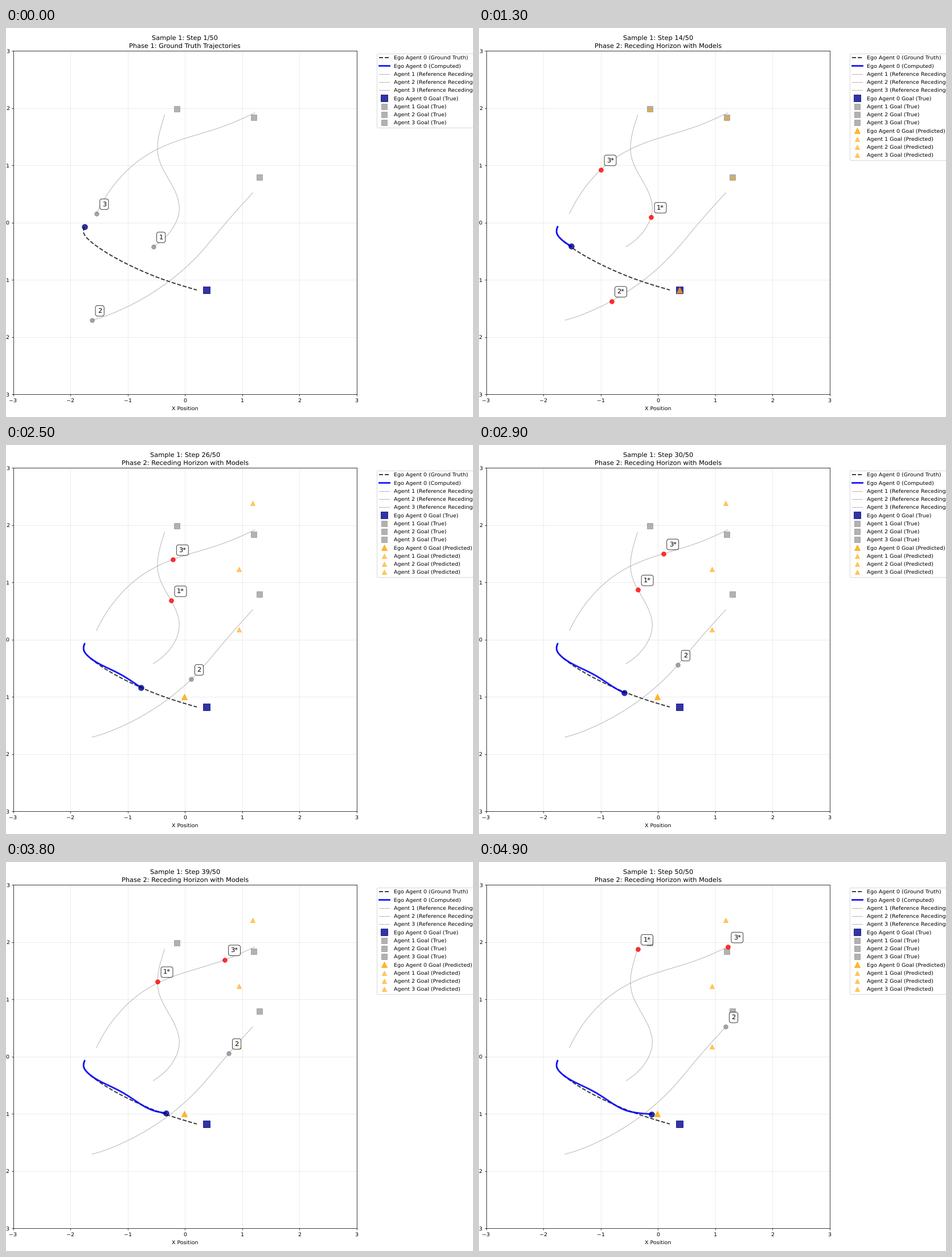
Recreate the animation shown at these times as a matplotlib script. Size 820 by 683 pixels, loop 5 s.

```python
import numpy as np
import matplotlib.pyplot as plt
from matplotlib.animation import FuncAnimation

plt.rcParams["font.family"] = "DejaVu Sans"
plt.rcParams["text.hinting"] = "none"

WIDTH, HEIGHT, DPI = 820, 683, 68.3
STEPS, INTERVAL = 50, 100
LEFT, TOP, SIDE = 12.5, 40.0, 603.3
PHASE_2_START = 10
PREDICTION_START = 20
KEY_STEPS = (0, 7, 13, 25, 34, 49)


def to_data(*points):
    """Stage pixels to axis units."""
    x, y = np.transpose(points)
    unit = SIDE / 6
    return np.column_stack([(x - LEFT) / unit - 3, 3 - (y - TOP) / unit])


def trajectory(*points, steps=KEY_STEPS):
    """Natural cubic spline through a few key points, one row per step."""
    t, p = np.array(steps, float), to_data(*points)
    n, h = len(t), np.diff(t)[:, None]
    slope = np.diff(p, axis=0) / h
    system, rhs = np.eye(n), np.zeros_like(p)
    for i in range(1, n - 1):
        a, b = h[i - 1, 0], h[i, 0]
        system[i, i - 1:i + 2] = a, 2 * (a + b), b
        rhs[i] = 6 * (slope[i] - slope[i - 1])
    curve = np.linalg.solve(system, rhs)

    at = np.arange(STEPS)
    k = np.clip(np.searchsorted(t, at, side="right") - 1, 0, n - 2)
    d = (at - t[k])[:, None]
    first = slope[k] - h[k] * (2 * curve[k] + curve[k + 1]) / 6
    return (p[k] + first * d + curve[k] / 2 * d**2
            + (curve[k + 1] - curve[k]) / (6 * h[k]) * d**3)


ego_truth = trajectory((138, 349), (139, 365), (162, 385), (227, 421.3),
                       (335, 460), steps=(0, 7, 13, 25, 49))
ego = trajectory((138, 349), (139, 365), (162, 383.3), (206, 405.5),
                 (237, 425.6), (270.6, 439.3), (303, 442.5),
                 steps=(0, 7, 13, 20, 25, 34, 49))
agents = [
    trajectory((258.5, 384), (285, 362), (302, 332), (290, 273.3),
               (268.5, 229.8), (278.5, 153)),
    trajectory((151, 513), (184.7, 502), (232.5, 479.5), (325.4, 411.3),
               (374, 356.5), (433.3, 289.3)),
    trajectory((158.7, 325.8), (182, 285.7), (214, 248.8), (293.3, 201),
               (360, 180), (436.8, 149)),
]

# Ego first, then agents 1 to 3
true_goals = to_data((352, 460.5), (299.5, 141.5), (444.5, 262), (435, 157))
predicted_goals = to_data((313, 442), (433, 102), (409, 324), (409, 217.5))

fig = plt.figure(figsize=((WIDTH + 0.001) / DPI, HEIGHT / DPI), dpi=DPI,
                 facecolor="white")
ax = fig.add_axes([LEFT / WIDTH, 1 - (TOP + SIDE) / HEIGHT,
                   SIDE / WIDTH, SIDE / HEIGHT])
ax.set(xlim=(-3, 3), ylim=(-3, 3),
       xticks=range(-3, 4), yticks=range(-3, 4))
ax.set_xlabel("X Position", labelpad=5.3)
ax.grid(True, alpha=0.3)


def marker(shape, color, size, alpha, label=None):
    return ax.plot([0], [0], shape, color=color, markersize=size,
                   alpha=alpha, label=label)[0]


def place(line, point):
    line.set_data(point[:1], point[1:])


truth_line, = ax.plot(*ego_truth.T, "k--", lw=2, alpha=0.8,
                      label="Ego Agent 0 (Ground Truth)")
ego_line, = ax.plot([], [], color="blue", lw=3, alpha=0.9,
                    label="Ego Agent 0 (Computed)")
handles = [truth_line, ego_line]
for i, path in enumerate(agents, 1):
    handles += ax.plot(*path.T, color="gray", lw=1, alpha=0.6,
                       label=f"Agent {i} (Reference Receding Horizon)")

names = ["Ego Agent 0"] + [f"Agent {i}" for i in (1, 2, 3)]
squares = [marker("s", "gray" if i else "darkblue", 10 if i else 12,
                  0.6 if i else 0.8, f"{name} Goal (True)")
           for i, name in enumerate(names)]
for square, goal in zip(squares, true_goals):
    place(square, goal)
handles += squares

ego_dot = marker("o", "darkblue", 10, 0.8)
dots = [marker("o", "gray", 8, 0.7) for _ in agents]
triangles = [marker("^", "orange", 8 if i else 10, 0.6 if i else 0.8,
                    f"{name} Goal (Predicted)")
             for i, name in enumerate(names)]
tags = [ax.text(0, 0, "", fontsize=12, va="bottom",
                bbox=dict(boxstyle="round,pad=0.35", facecolor="white",
                          edgecolor="black", alpha=0.8))
        for _ in agents]


def update(frame):
    modelled = frame >= PHASE_2_START
    inferred = frame >= PREDICTION_START
    phase = ("Phase 2: Receding Horizon with Models" if modelled
             else "Phase 1: Ground Truth Trajectories")
    ax.set_title(f"Sample 1: Step {frame + 1}/{STEPS}\n{phase}",
                 linespacing=1.36)

    ego_line.set_data(*ego[:frame + 1].T)
    place(ego_dot, ego[frame])

    for i, (path, dot, tag) in enumerate(zip(agents, dots, tags), 1):
        selected = modelled and not (inferred and i == 2)
        place(dot, path[frame])
        dot.set_color("red" if selected else "gray")
        dot.set_alpha(0.8 if selected else 0.7)
        tag.set_position(path[frame] + (0.1, 0.11))
        tag.set_text(f"{i}*" if selected else str(i))

    goals = predicted_goals if inferred else true_goals
    for triangle, goal in zip(triangles, goals):
        place(triangle, goal)
        triangle.set_visible(modelled)

    ax.legend(handles=handles + (triangles if modelled else []),
              loc="upper left", bbox_to_anchor=(1.05, 1), labelspacing=0.585)
    return []


anim = FuncAnimation(fig, update, frames=STEPS, interval=INTERVAL,
                     init_func=lambda: update(0), repeat=True,
                     repeat_delay=0, blit=False)
plt.show()
```
